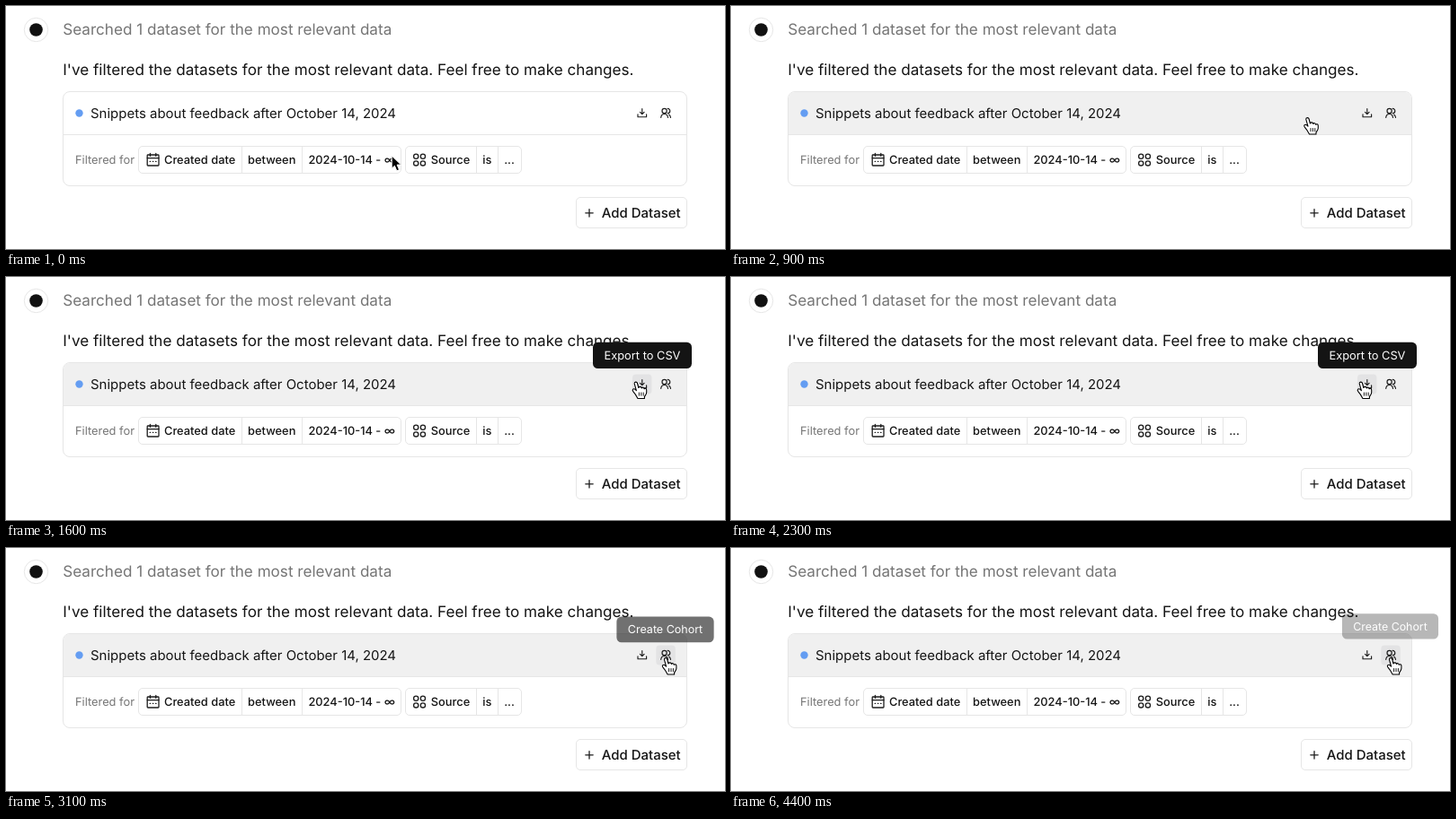
An HTML page for the animation above (4.5 s loop, 800x271 px).

```html
<!DOCTYPE html>
<html lang="en">
<head>
<meta charset="utf-8">
<title>Dataset filter card</title>
<style>
  html, body { margin: 0; width: 100%; height: 100%; overflow: hidden; background: #fff; }
  svg { display: block; width: 100vw; height: 100vh; }
  text { font-family: Inter, "Liberation Sans", sans-serif; fill: #141414; text-rendering: geometricPrecision; }
  .lead { font-size: 17.12px; }
  .title { font-size: 14.98px; }
  .small { font-size: 12.84px; }
  .medium { font-weight: 500; }
  .muted { fill: #757575; }
  .box { fill: #fff; stroke: #e6e6e6; }
  .rule { fill: none; stroke: #e6e6e6; }
  .icon { fill: none; stroke: #1c1c1c; stroke-width: 1.3; stroke-linecap: round; stroke-linejoin: round; }
  .fine { stroke-width: 1.15; }
  .hot { fill: #e3e3e4; }
  .tip rect { fill: #141414; }
  .tip text { fill: #fff; text-anchor: middle; }
  .hidden { visibility: hidden; }
</style>
</head>
<body>
<svg viewBox="0 0 800 271">
  <circle class="box" cx="33.5" cy="26.5" r="13.2"/>
  <circle cx="33.5" cy="26.5" r="7.3" fill="#111"/>
  <text class="lead muted" x="63.2" y="32.3">Searched 1 dataset for the most relevant data</text>
  <text class="lead" x="63.2" y="77.2">I've filtered the datasets for the most relevant data. Feel free to make changes.</text>

  <!-- card -->
  <rect class="box" x="63.5" y="95.5" width="694" height="105" rx="7.5"/>
  <path id="row" fill="#f0f0f0" d="M64 143.5V103a7 7 0 0 1 7-7H750a7 7 0 0 1 7 7V143.5Z"/>
  <path class="rule" d="M64 143.5H757"/>
  <circle cx="81.5" cy="119.5" r="4.2" fill="#649df2"/>
  <text class="title" x="94" y="124.8">Snippets about feedback after October 14, 2024</text>

  <rect id="hotExport" class="hot" x="697" y="108.5" width="21.5" height="22" rx="4"/>
  <rect id="hotCohort" class="hot" x="723.3" y="108.5" width="21.5" height="22" rx="4"/>
  <g class="icon fine">
    <path d="M703 120.8v2.9h9.6v-2.9M707.8 114.6v6m-2.3-2.3l2.3 2.3 2.3-2.3"/>
    <circle cx="732.6" cy="117" r="2.6"/>
    <path d="M728.7 124.4c.3-2.7 2-3.9 3.9-3.900s3.600 1.200 3.900 3.900M736.200 114.400a2.600 2.600 0 0 1 0 5.200M737.600 121c1.200.7 1.700 1.800 1.900 3.400"/>
  </g>

  <!-- filters -->
  <text class="small muted" x="77" y="176.2">Filtered for</text>
  <rect class="box" x="147.5" y="156.5" width="292" height="30" rx="4.5"/>
  <path class="rule" d="M262.5 157v29M329.5 157v29"/>
  <g class="icon">
    <rect x="157.2" y="166" width="12.8" height="12" rx=".8"/>
    <path d="M157.2 169.6h12.8M160.4 164.4v3M166.8 164.4v3M160.2 173.4h.4M163.4 173.4h.4M166.600 173.400h.4"/>
  </g>
  <g class="small medium">
    <text x="176" y="176.2">Created date</text>
    <text x="269.1" y="176.2">between</text>
    <text x="336.4" y="176.2">2024-10-14 - ∞</text>
  </g>
  <rect class="box" x="444.5" y="156.5" width="129" height="30" rx="4.5"/>
  <path class="rule" d="M523.5 157v29M547.5 157v29"/>
  <g class="icon">
    <circle cx="456.2" cy="167.7" r="2.6"/>
    <circle cx="463.9" cy="167.7" r="2.6"/>
    <circle cx="456.2" cy="175.4" r="2.6"/>
    <circle cx="463.9" cy="175.4" r="2.6"/>
  </g>
  <g class="small medium">
    <text x="472.8" y="176.2">Source</text>
    <text x="530.3" y="176.2">is</text>
    <text x="554.2" y="176.2">...</text>
  </g>

  <rect class="box" x="634.5" y="213.5" width="123" height="34" rx="4.5"/>
  <path class="icon" d="M644.8 230.8h8.4M649 226.6v8.4"/>
  <text class="title medium" x="662.8" y="236.1">Add Dataset</text>

  <!-- tooltips, drawn around their own centre -->
  <g id="tipExport" class="tip">
    <rect x="-55" y="-14.7" width="110" height="29.4" rx="5.5"/>
    <text class="small" y="4.5">Export to CSV</text>
  </g>
  <g id="tipCohort" class="tip">
    <rect x="-55.5" y="-14.7" width="111" height="29.4" rx="5.5"/>
    <text class="small" y="4.5">Create Cohort</text>
  </g>

  <g id="pointer" stroke-linejoin="round">
    <path id="arrow" fill="#000" stroke="#fff" d="M0 0V14.2L3.2 11.2 5.6 16.8 8.3 15.6 5.9 10.1H10.4Z"/>
    <g id="hand" stroke="#000" stroke-width="1.1">
      <path fill="#fff" d="M-1.6 1.6C-1.8-.6 1.2-.8 1.7 1.2L3 6.2C3.6 4.6 6 4.7 6.4 6.6 7.2 5.4 9 5.7 9.3 7.5 10.2 6.4 11.9 6.9 11.9 8.6V11.5C11.9 13.5 10 15.2 9.6 16.2V18.2H2.2C1.2 16.4-.4 13.4-3 10.4-4.6 8.4-2.8 6.6-.7 8L.6 9.4Z"/>
      <path fill="none" stroke-width=".9" d="M3.6 11.3v4M6 11.3v4M8.4 11.3v4"/>
    </g>
  </g>
</svg>
<script>
  const LOOP = 4500, STEP = 100;
  const $ = id => document.getElementById(id);
  const show = (id, on) => $(id).classList.toggle("hidden", !on);
  const clamp = u => Math.min(1, Math.max(0, u));
  const smooth = u => u * u * (3 - 2 * u);

  // Pointer stops, and the times of travel between them
  const stops = [[429.2, 167], [513, 141], [700.8, 117.3], [734, 122.8]];
  const trips = [[0, 200], [400, 1200], [2600, 3000]];

  function pointerAt(t) {
    let [x, y] = stops[0];
    trips.forEach(([start, end], i) => {
      const u = smooth(clamp((t - start) / (end - start)));
      x += (stops[i + 1][0] - stops[i][0]) * u;
      y += (stops[i + 1][1] - stops[i][1]) * u;
    });
    return [x, y];
  }

  // Enters rising and growing, leaves shrinking in place
  const entry = [[0.07, 8.5, 0.94], [0.6, 3.5, 0.975]];
  const exit = [0.3, 0, 0.965];

  function tooltip(id, cx, t, from, to) {
    const n = (t - from) / STEP;
    const gone = n < 0 || t > to;
    const [alpha, dy, scale] = gone ? [0, 0, 1] : t === to ? exit : entry[n] || [1, 0, 1];
    $(id).setAttribute("opacity", alpha);
    $(id).setAttribute("transform", `translate(${cx} ${87.4 + dy}) scale(${scale})`);
  }

  function draw() {
    const t = Math.floor(performance.now() % LOOP / STEP) * STEP;
    const [x, y] = pointerAt(t);
    const inRow = y < 144;
    $("pointer").setAttribute("transform", `translate(${x} ${y})`);
    show("arrow", !inRow);
    show("hand", inRow);
    show("row", inRow);
    show("hotExport", x > 690 && x < 720);
    show("hotCohort", x >= 720);
    tooltip("tipExport", 708, t, 1400, 2900);
    tooltip("tipCohort", 733.5, t, 3000, 4400);
    requestAnimationFrame(draw);
  }
  draw();
</script>
</body>
</html>
```
